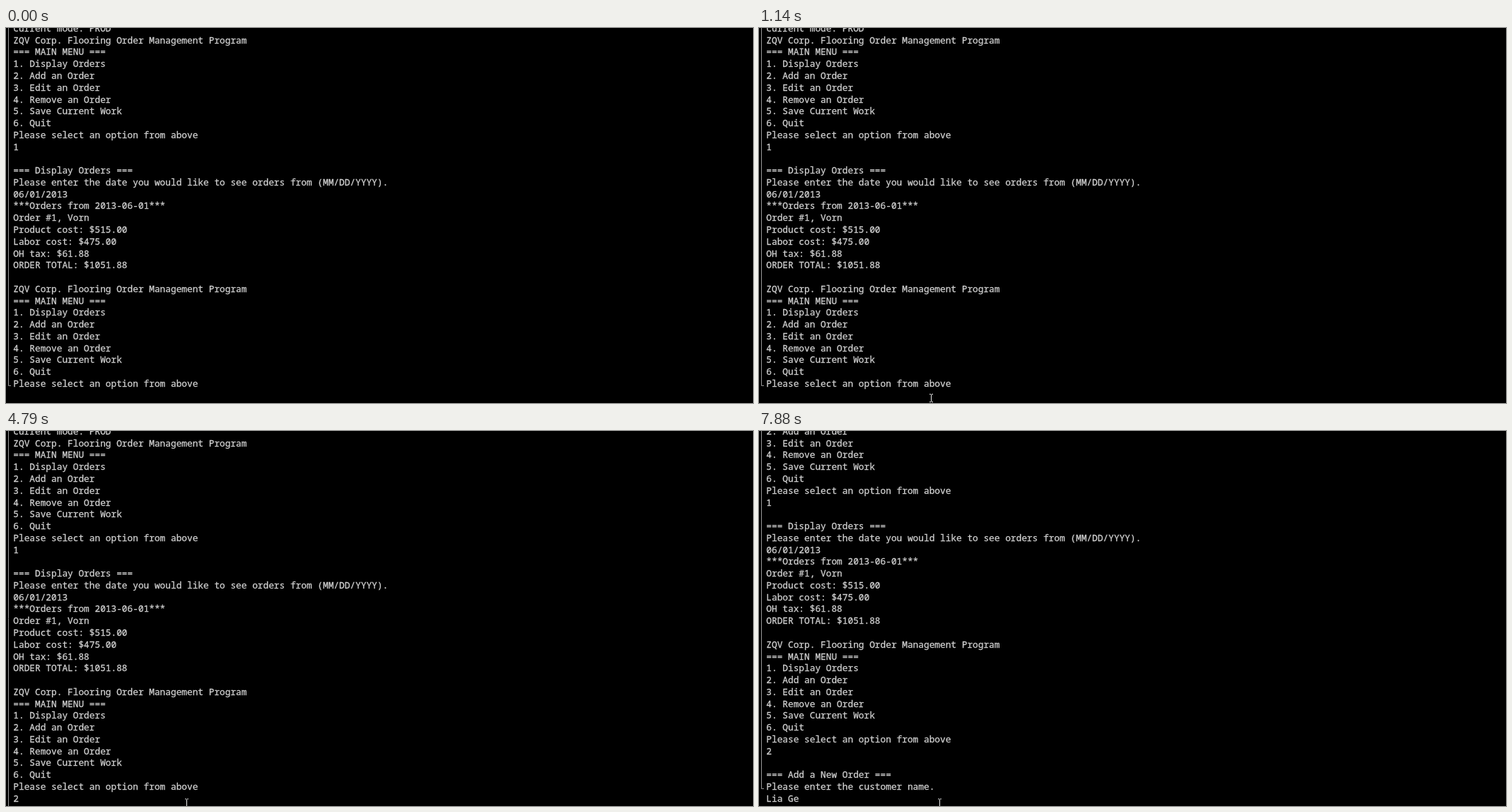
Write an HTML page with a canvas that moves like this. It is 1056x531 px and loops after 8000 ms.

```html
<!DOCTYPE html>
<html lang="en">
<head>
<meta charset="utf-8">
<style>
  html, body { margin: 0; height: 100%; overflow: hidden; background: #000; }
  canvas { display: block; }
</style>
</head>
<body>
<canvas id="stage" width="1056" height="531"></canvas>
<script>
const ctx = document.getElementById('stage').getContext('2d');
const LOOP = 8000, ROW = 16.77, INPUT_ROW = 31;

const menu = `ZQV Corp. Flooring Order Management Program
=== MAIN MENU ===
1. Display Orders
2. Add an Order
3. Edit an Order
4. Remove an Order
5. Save Current Work
6. Quit
Please select an option from above`;

const lines = `Current mode: PROD
${menu}
1

=== Display Orders ===
Please enter the date you would like to see orders from (MM/DD/YYYY).
06/01/2013
***Orders from 2013-06-01***
Order #1, Vorn
Product cost: $515.00
Labor cost: $475.00
OH tax: $61.88
ORDER TOTAL: $1051.88

${menu}`.split('\n');

const nextLines = [...lines, '2', '', '=== Add a New Order ===',
  'Please enter the customer name.'].slice(4);

// [start time, value] steps
const typed = [[0, ''], [1680, '1'], [3780, ''], [4240, '2'], [4850, ''],
  [7190, 'L'], [7270, 'Li'], [7420, 'Lia'], [7820, 'Lia G'], [7880, 'Lia Ge']];
const pointer = [[0, null], [290, [254.5, 531]], [360, [240.5, 529]],
  [430, [228.5, 528]], [750, [228.5, 520.5]], [1140, [243.5, 524]],
  [1210, [255.5, 526.5]]];

const at = (steps, t) => steps.filter(([start]) => start <= t).pop()[1];

function stroke(color, ...points) {
  ctx.lineWidth = 1;
  ctx.strokeStyle = color;
  ctx.beginPath();
  points.forEach(([x, y], i) => i ? ctx.lineTo(x, y) : ctx.moveTo(x, y));
  ctx.stroke();
}

// A hairline outline gives the console's slightly heavier letters.
function drawText(text, row) {
  const y = Math.round(4.9 + ROW * row);
  ctx.fillStyle = ctx.strokeStyle = '#d0d0d0';
  ctx.lineWidth = 0.3;
  ctx.fillText(text, 10.3, y);
  ctx.strokeText(text, 10.3, y);
}

function drawPointer(x, y, clicked) {
  if (clicked) {
    ctx.fillStyle = '#858500';
    ctx.beginPath();
    ctx.arc(227, 520, 10.5, 0, Math.PI * 2);
    ctx.fill();
  }
  stroke('#eee', [x, y - 5], [x, y + 5]);
  for (const end of [y - 5.5, y + 5.5]) {
    stroke('#ddd', [x - 2.5, end], [x - 0.5, end]);
    stroke('#ddd', [x + 0.5, end], [x + 2.5, end]);
  }
}

function draw(t) {
  ctx.fillStyle = '#000';
  ctx.fillRect(0, 0, 1056, 531);

  if (t >= 4790 && t < 4850) stroke('#999', [3.5, 0], [3.5, 531]);
  else stroke('#999', [3.5, 0], [3.5, 506.5], [7, 506.5]);

  ctx.font = '12.81px "Noto Sans Mono", monospace';
  (t < 4850 ? lines : nextLines).forEach(drawText);
  drawText(at(typed, t), INPUT_ROW);

  const position = at(pointer, t);
  if (position) drawPointer(...position, t >= 820 && t < 980);
}

function tick(now) {
  draw(now % LOOP);
  requestAnimationFrame(tick);
}
draw(0);
requestAnimationFrame(tick);
</script>
</body>
</html>
```
